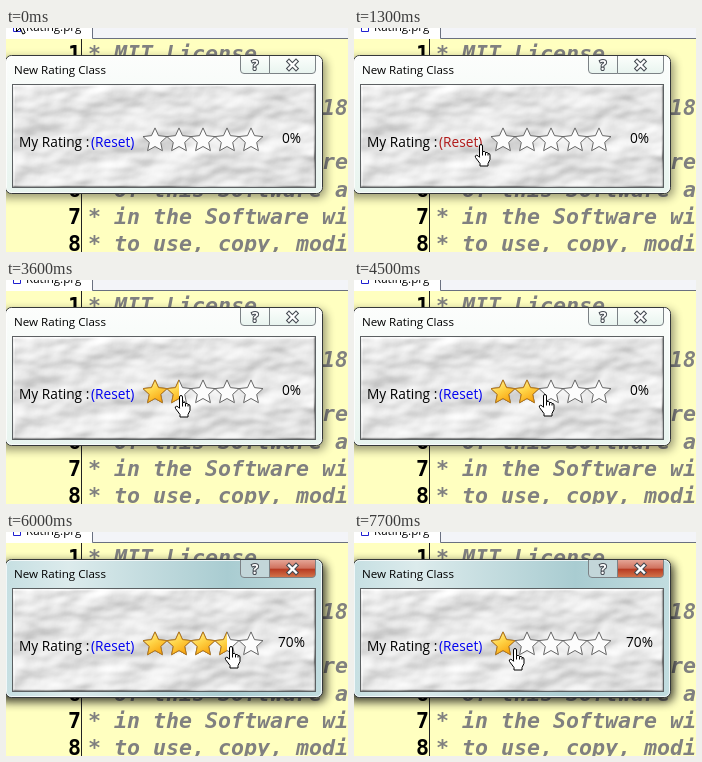
Write an HTML page that moves like this. It is 342 px wide and 224 px high and loops after 8 s.

```html
<!DOCTYPE html>
<html>
<head>
<meta charset="utf-8">
<style>
html, body { margin: 0; width: 100%; height: 100%; overflow: hidden; background: #ffffc0; }
svg { display: block; }
text { white-space: pre; }
.code { font: italic bold 21.6px "DejaVu Sans Mono", monospace; fill: #808080; }
.num { font: bold 21.6px "DejaVu Sans Mono", monospace; text-anchor: end; }
.ui { font: 13.7px "Open Sans", sans-serif; fill: #000; }
.small { font: 11.6px "Open Sans", sans-serif; fill: #000; }
</style>
</head>
<body>
<svg width="342" height="224" viewBox="0 0 342 224">
  <defs>
    <filter id="blur" x="-20%" y="-30%" width="140%" height="160%"><feGaussianBlur stdDeviation="5"/></filter>
    <filter id="paper" x="0" y="0" width="100%" height="100%" color-interpolation-filters="sRGB">
      <feTurbulence type="fractalNoise" baseFrequency=".02 .035" numOctaves="3" seed="8"/>
      <feGaussianBlur stdDeviation="1"/>
      <feDiffuseLighting surfaceScale="3" diffuseConstant="1.13" lighting-color="#e6e6e6">
        <feDistantLight azimuth="235" elevation="62"/>
      </feDiffuseLighting>
    </filter>
    <linearGradient id="gold" x2=".6" y2="1">
      <stop stop-color="#fff4b0"/><stop offset=".5" stop-color="#ffd548"/><stop offset="1" stop-color="#f8a510"/>
    </linearGradient>
    <linearGradient id="idle" x2="0" y2="1">
      <stop stop-color="#fcfdfc"/><stop offset=".3" stop-color="#f6fbf8"/><stop offset="1" stop-color="#e8f4ef"/>
    </linearGradient>
    <linearGradient id="live">
      <stop stop-color="#c6dfe2"/><stop offset=".2" stop-color="#dcebec"/>
      <stop offset=".7" stop-color="#a9ccd1"/><stop offset="1" stop-color="#c2dde0"/>
    </linearGradient>
    <linearGradient id="red" x2="0" y2="1">
      <stop stop-color="#e5a596"/><stop offset=".48" stop-color="#cf705c"/>
      <stop offset=".5" stop-color="#b63820"/><stop offset="1" stop-color="#d4764c"/>
    </linearGradient>
    <clipPath id="half"><rect x="-14" y="-14" width="14" height="28"/></clipPath>
  </defs>

  <rect width="342" height="224" fill="#ffffc0"/>
  <path d="M75.5 11V224" stroke="#222"/>
  <g id="code"></g>
  <rect width="342" height="11" fill="#f3f4f8"/>
  <path d="M0 0H86V11H0z" fill="#fff"/>
  <path d="M86.5 0V10.5H342" fill="none" stroke="#6a7080"/>
  <path d="M7.5-4V3.5h7V-4" fill="#fff" stroke="#2020d0"/>
  <text class="small" x="20" y="3">Rating.prg</text>

  <rect id="shadow" x="-8" y="30" width="328" height="140" rx="8" filter="url(#blur)"/>
  <rect id="frame" x="-.5" y="27.5" width="317" height="138" rx="6" stroke="#35383a"/>
  <rect x=".5" y="28.5" width="315" height="136" rx="5" fill="none" stroke="#fff" stroke-opacity=".75"/>
  <text class="small" x="8" y="46">New Rating Class</text>
  <g stroke="#7c8286">
    <path id="help" d="M234.5 28V42q0 3.500 3.500 3.500H263.500V28"/>
    <path id="close" d="M263.500 28V45.500H306q3.500 0 3.500-3.500V28"/>
  </g>
  <text x="249" y="42" text-anchor="middle" font-family="Open Sans, sans-serif" font-weight="700" font-size="14"
    fill="#fff" stroke="#454a52" stroke-width="2" paint-order="stroke">?</text>
  <g stroke-linecap="square">
    <path d="M283 33.500l7 7m0-7l-7 7" stroke="#454a52" stroke-width="4.500"/>
    <path d="M283 33.500l7 7m0-7l-7 7" stroke="#fff" stroke-width="2.400"/>
  </g>
  <rect x="6" y="56" width="304" height="104" filter="url(#paper)"/>
  <rect x="6.500" y="56.500" width="303" height="103" fill="none" stroke="#5c6062"/>

  <text class="ui" x="13" y="119">My Rating :</text>
  <text class="ui" id="reset" x="85" y="119">(Reset)</text>
  <g id="stars"></g>
  <text class="ui" id="percent" x="285.500" y="115" text-anchor="middle"></text>

  <g id="cursor" fill="#fff" stroke="#000" stroke-linejoin="round">
    <path id="arrow" d="M.5.5V16.500l3.700-3.500 2.600 6 2.400-1-2.600-5.700h5.200z"/>
    <path id="hand" transform="translate(-5 0)" d="M4.500 13V2q0-1.500 1.500-1.500t1.500 1.500v5.500q3-.6 3 1 2.500-.5 2.500 1 2-.3 2 1.500v4.500l-2 4v2.500h-8v-2.500l-4.500-6q-1-2 1-2.200 1.500 0 3 2zM7.500 7.500v4M10.500 8.500v3M13 9.500v2"/>
  </g>
</svg>
<script>
const $ = id => document.getElementById(id);
const show = (el, on) => el.setAttribute("visibility", on ? "visible" : "hidden");

const license = ["MIT License", "", "Copyright (c) 2018", "", "Permission is hereby",
  "of this Software and", "in the Software without", "to use, copy, modify,"];
$("code").innerHTML = license.map((line, i) => {
  const y = 33 + i * 27.1;
  return `<text class="num" x="75" y="${y}">${i + 1}</text><text class="code" x="82" y="${y}">* ${line}</text>`;
}).join("");

const points = Array.from({ length: 10 }, (_, i) => {
  const r = i % 2 ? 6 : 12.6, a = i * Math.PI / 5;
  return [r * Math.sin(a), -r * Math.cos(a)].map(v => v.toFixed(1));
}).join(" ");
const star = (fill, stroke, extra = "") =>
  `<polygon points="${points}" fill="${fill}" stroke="${stroke}" stroke-linejoin="round" ${extra}/>`;
$("stars").innerHTML = [0, 1, 2, 3, 4].map(i => `<g transform="translate(${149 + 24 * i} 112.5)">` +
  star("#fcfcfc", "#666") + star("url(#gold)", "#b87818", 'clip-path="url(#half)"') +
  star("url(#gold)", "#b87818") + "</g>").join("");

// Pointer moves: start, end, x, y
const moves = [
  [400, 1300, 126, 116], [1300, 1600, 142, 116], [1800, 1900, 147, 116],
  [2300, 2400, 150, 115], [3100, 3600, 174, 115], [3900, 4600, 190, 114],
  [4700, 5000, 214, 114], [5100, 5300, 224, 114], [7200, 7700, 160, 116]
];

function pointer(t) {
  let x = 10, y = -13;
  for (const [from, to, nx, ny] of moves) {
    const p = Math.min(1, Math.max(0, (t - from) / (to - from)));
    const e = p * (2 - p);
    x += (nx - x) * e;
    y += (ny - y) * e;
  }
  return [Math.round(x), Math.round(y)];
}

function draw() {
  const t = Math.floor(performance.now() % 8000 / 100) * 100;
  const [x, y] = pointer(t);
  const live = t >= 6000;
  const link = x > 84 && y > 98;
  const rating = link ? Math.max(0, Math.round((x - 137) / 12) / 2) : 0;

  $("cursor").setAttribute("transform", `translate(${x} ${y})`);
  show($("hand"), link);
  show($("arrow"), !link);
  $("reset").style.fill = link && x < 131 ? "#b01818" : "#0000f0";
  [...$("stars").children].forEach((g, i) => {
    show(g.children[1], rating - i === 0.5);
    show(g.children[2], rating - i >= 1);
  });
  $("percent").textContent = live ? "70%" : "0%";
  $("shadow").setAttribute("opacity", live ? 0.75 : 0.4);
  $("frame").setAttribute("fill", live ? "url(#live)" : "url(#idle)");
  $("help").setAttribute("fill", live ? "#c3d6d9" : "url(#idle)");
  $("close").setAttribute("fill", live ? "url(#red)" : "url(#idle)");
  requestAnimationFrame(draw);
}
draw();
</script>
</body>
</html>
```
